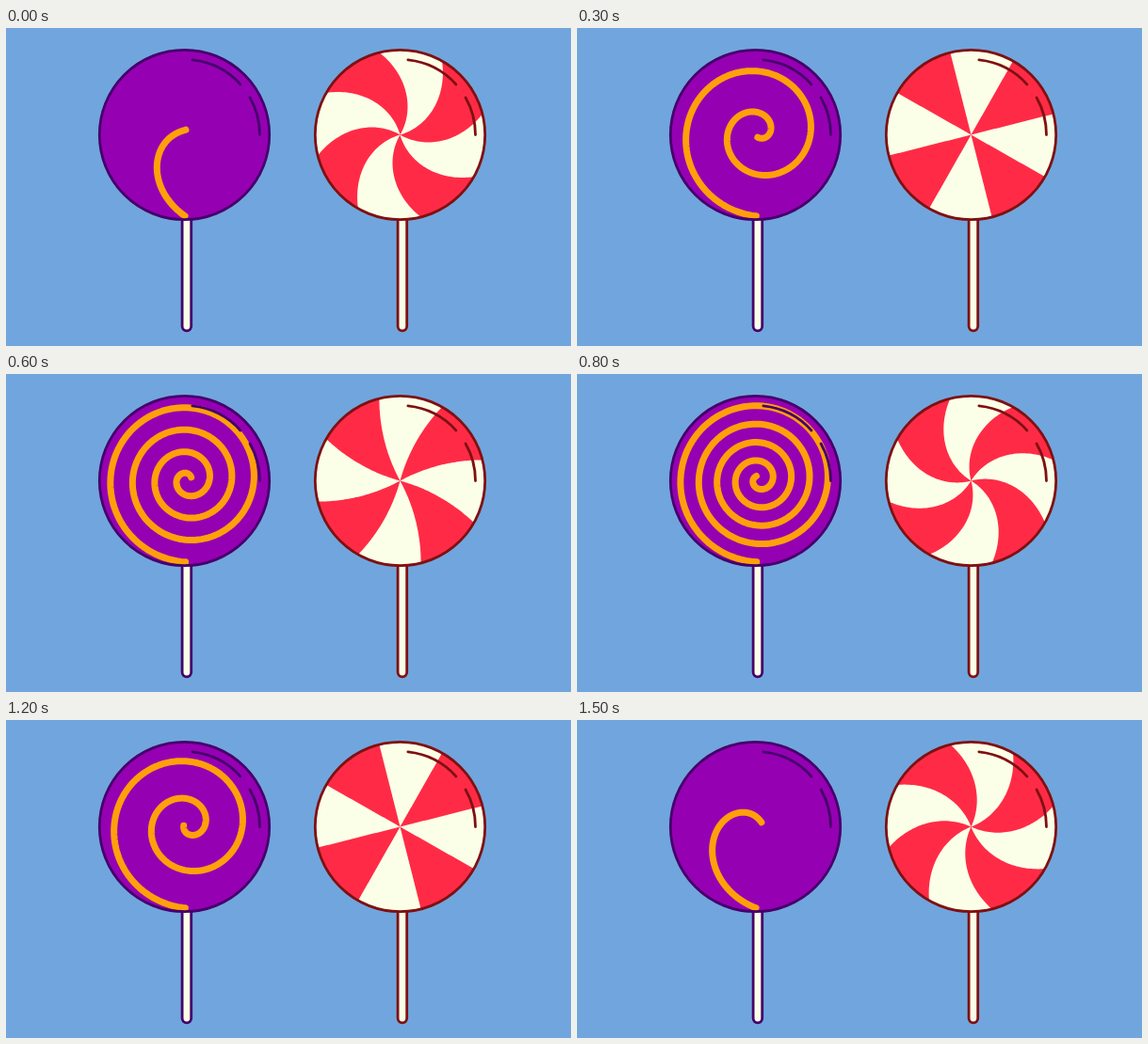
Animation, 600 px wide and 338 px high, one loop 1600 ms. Source, as an HTML page with a canvas:

```html
<!DOCTYPE html>
<html>
<head>
<meta charset="utf-8">
<title>Lollipops</title>
<style>
  html, body { margin: 0; width: 100%; height: 100%; overflow: hidden; background: #70a6dd; }
  canvas { display: block; }
</style>
</head>
<body>
<canvas id="stage" width="600" height="338"></canvas>
<script>
const ctx = document.getElementById('stage').getContext('2d');
const LOOP = 1600, STEP = 100, TURN_POINT = 1568;
const DEG = Math.PI / 180;
const RADIUS = 90.2, CREAM = '#fcffe7';
const grape = { x: 189.5, y: 113.5, fill: '#9600b3', line: '#45006b' };
const mint = { x: 418.5, y: 113.5, fill: '#ff2b46', line: '#7f1012' };

// Signed distance in ms from a moment, wrapped around the loop
const since = (t, moment) => ((t - moment + LOOP * 2.5) % LOOP) - LOOP / 2;

function spiralTwist(t) {
  return 20 + 2.1 * (LOOP / 2 - Math.abs(since(t, TURN_POINT - LOOP / 2)));
}

function mintTwist(t) {
  const bump = moment => {
    const d = Math.abs(since(t, moment)) / 270;
    return d < 1 ? Math.cos(d * Math.PI / 2) ** 2 : 0;
  };
  return 46 * (bump(TURN_POINT) - bump(TURN_POINT - LOOP / 2));
}

function stick({ x, line }) {
  ctx.beginPath();
  ctx.roundRect(x - 2.4, 190, 9.6, 131.8, 4.8);
  ctx.fillStyle = CREAM;
  ctx.fill();
  ctx.strokeStyle = line;
  ctx.lineWidth = 2.8;
  ctx.stroke();
}

function disc({ x, y, fill }) {
  ctx.beginPath();
  ctx.arc(x, y, RADIUS, 0, 2 * Math.PI);
  ctx.fillStyle = fill;
  ctx.fill();
}

function outline({ x, y, line }) {
  ctx.strokeStyle = line;
  ctx.lineWidth = 2.8;
  for (const [from, to] of [[0, 360], [-84, -42], [-29.6, 0]]) {
    ctx.beginPath();
    ctx.arc(x, y, to === 360 ? RADIUS : 80, from * DEG, to * DEG);
    ctx.stroke();
  }
}

// A vertical line just left of the centre, wound up around it
function spiral(twist) {
  const cx = 193, cy = 112, length = 88;
  ctx.beginPath();
  for (let s = 1.4; s <= length; s += 0.2) {
    const side = -3 - 1.3 * Math.exp(-s / 8);
    const wind = twist * (1 - Math.hypot(s, 6.3) / length);
    const a = Math.atan2(s, side) + wind * DEG;
    const r = Math.hypot(s, side);
    ctx.lineTo(cx + r * Math.cos(a), cy + r * Math.sin(a));
  }
  ctx.strokeStyle = '#ffa00a';
  ctx.lineWidth = 7;
  ctx.stroke();
}

function stripes({ x, y }, twist) {
  const point = (r, angle) => {
    const a = (angle + twist * (1 - r / RADIUS)) * DEG;
    ctx.lineTo(x + r * Math.cos(a), y + r * Math.sin(a));
  };
  ctx.fillStyle = CREAM;
  for (let mid = -82.3; mid < 270; mid += 90) {
    const from = mid - 21.9, to = mid + 21.9;
    ctx.beginPath();
    for (let r = 0; r < RADIUS; r += 2) point(r, from);
    ctx.arc(x, y, RADIUS, from * DEG, to * DEG);
    for (let r = 90; r >= 0; r -= 2) point(r, to);
    ctx.fill();
  }
}

function draw(now) {
  const t = Math.floor((now % LOOP) / STEP) * STEP;
  ctx.fillStyle = '#70a6dd';
  ctx.fillRect(0, 0, 600, 338);
  ctx.lineCap = ctx.lineJoin = 'round';
  for (const candy of [grape, mint]) {
    stick(candy);
    disc(candy);
  }
  spiral(spiralTwist(t));
  stripes(mint, mintTwist(t));
  outline(grape);
  outline(mint);
}

const start = performance.now();
function tick() {
  draw(performance.now() - start);
  requestAnimationFrame(tick);
}
tick();
</script>
</body>
</html>
```
